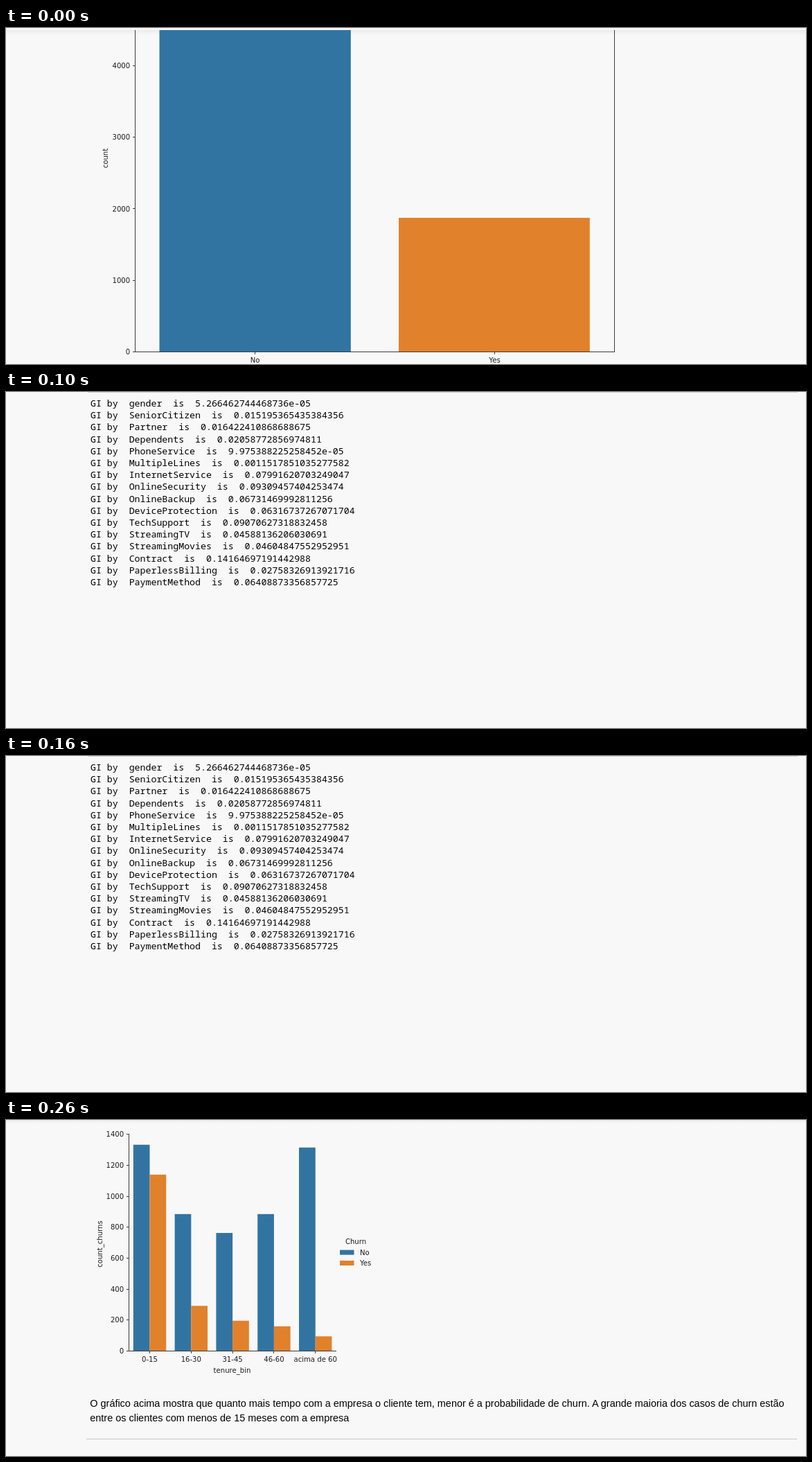
Recreate the animation shown at these times as an HTML page. Size 1155 by 485 pixels, loop 0.3 s.

```html
<!DOCTYPE html>
<html lang="pt">
<head>
<meta charset="utf-8">
<title>Churn</title>
<style>
html, body { margin: 0; width: 100%; height: 100%; overflow: hidden; background: #f8f8f8; }
svg { display: block; width: 1155px; height: 485px; }
text { white-space: pre; fill: #1c1c1c; font: 10.1px "DejaVu Sans", sans-serif; }
.log text { fill: #000; font: 13.26px "Noto Sans Mono", monospace; }
.note { fill: #000; font: 14.44px "Liberation Sans", Arial, sans-serif; }
</style>
</head>
<body>
<svg id="stage" viewBox="0 0 1155 485"></svg>
<script>
const BLUE = '#3274a1', ORANGE = '#e1812c', AXIS = '#3c3c3c';
const stage = document.getElementById('stage');

const rect = (x, y, w, h, fill) =>
  `<rect x="${x}" y="${y}" width="${w}" height="${h}" fill="${fill}"/>`;
const text = (x, y, str, anchor = 'start', attrs = '') =>
  `<text x="${x}" y="${y}" text-anchor="${anchor}" ${attrs}>${str}</text>`;
const upright = (x, y, str) =>
  text(x, y, str, 'middle', `transform="rotate(-90 ${x} ${y})"`);
const shadow = (y, h) => rect(0, y, 1155, h, 'url(#shade)');

const yTicks = (axisX, zeroY, step, pitch, count) =>
  Array.from({ length: count }, (_, i) => {
    const y = zeroY - i * pitch;
    return rect(axisX - 3, Math.round(y), 3, 1, AXIS) +
      text(axisX - 6.8, y + 4.1, i * step, 'end');
  }).join('');
const xTick = (x, axisY, label) =>
  rect(Math.round(x - .5), axisY, 1, 4, AXIS) + text(x, axisY + 15.6, label, 'middle');

function totals() {
  return shadow(3, 7) +
    rect(221.5, 3, 276.3, 464, BLUE) + rect(567, 274, 275.8, 193, ORANGE) +
    rect(186, 3, 1, 465, AXIS) + rect(878, 3, 1, 465, AXIS) + rect(186, 467, 693, 1, AXIS) +
    yTicks(186, 467, 1000, 103.3, 5) +
    xTick(359.5, 467, 'No') + xTick(705.5, 467, 'Yes') + upright(147, 188, 'count');
}

function gains() {
  const rows = `gender 5.266462744468736e-05
SeniorCitizen 0.015195365435384356
Partner 0.016422410868688675
Dependents 0.02058772856974811
PhoneService 9.975388225258452e-05
MultipleLines 0.0011517851035277582
InternetService 0.07991620703249047
OnlineSecurity 0.09309457404253474
OnlineBackup 0.06731469992811256
DeviceProtection 0.06316737267071704
TechSupport 0.09070627318832458
StreamingTV 0.04588136206030691
StreamingMovies 0.04604847552952951
Contract 0.14164697191442988
PaperlessBilling 0.02758326913921716
PaymentMethod 0.06408873356857725`.split('\n');
  return rect(118, 0, 1025, 1, '#cfcfcf') + rows.map((row, i) =>
    text(122, 21 + i * 17.2, 'GI by  ' + row.replace(' ', '  is  '))).join('');
}

function tenure() {
  const bins = [
    ['0-15', 1333, 1140], ['16-30', 885, 292], ['31-45', 763, 196],
    ['46-60', 885, 160], ['acima de 60', 1315, 95]
  ];
  const bar = (x, value, fill) => {
    const h = value * .2234;
    return rect(x, 333.5 - h, 23.7, h, fill);
  };
  const bars = bins.map(([label, no, yes], i) => {
    const x = 207.5 + i * 59.8;
    return bar(x - 23.7, no, BLUE) + bar(x, yes, ORANGE) + xTick(x, 333, label);
  }).join('');
  const key = (y, label, fill) => rect(482, y - 7, 20.5, 7, fill) + text(511, y, label);
  return shadow(0, 5) + bars +
    rect(177, 20, 1, 314, AXIS) + rect(177, 333, 300, 1, AXIS) +
    yTicks(177, 333, 200, 44.7, 8) +
    text(326.5, 365, 'tenure_bin', 'middle') + upright(138.5, 179, 'count_churns') +
    text(505, 179, 'Churn', 'middle') + key(194.6, 'No', BLUE) + key(210, 'Yes', ORANGE) +
    text(121.3, 414, 'O gráfico acima mostra que quanto mais tempo com a empresa o cliente tem, menor é a probabilidade de churn. A grande maioria dos casos de churn estão', 'start', 'class="note"') +
    text(121.3, 435, 'entre os clientes com menos de 15 meses com a empresa', 'start', 'class="note"') +
    rect(116, 460, 1026, 1, '#c6c6c6');
}

stage.innerHTML = `<defs><linearGradient id="shade" x2="0" y2="1">
  <stop stop-color="#ebebeb"/><stop offset="1" stop-color="#f8f8f8"/>
</linearGradient></defs>
<g class="scene">${totals()}</g><g class="scene log">${gains()}</g><g class="scene">${tenure()}</g>`;

const scenes = stage.querySelectorAll('.scene');
function draw(now) {
  const current = Math.floor(now % 300 / 100);
  scenes.forEach((scene, i) => scene.style.display = i === current ? '' : 'none');
}
const start = performance.now();
function tick() {
  draw(performance.now() - start);
  requestAnimationFrame(tick);
}
tick();
</script>
</body>
</html>
```
